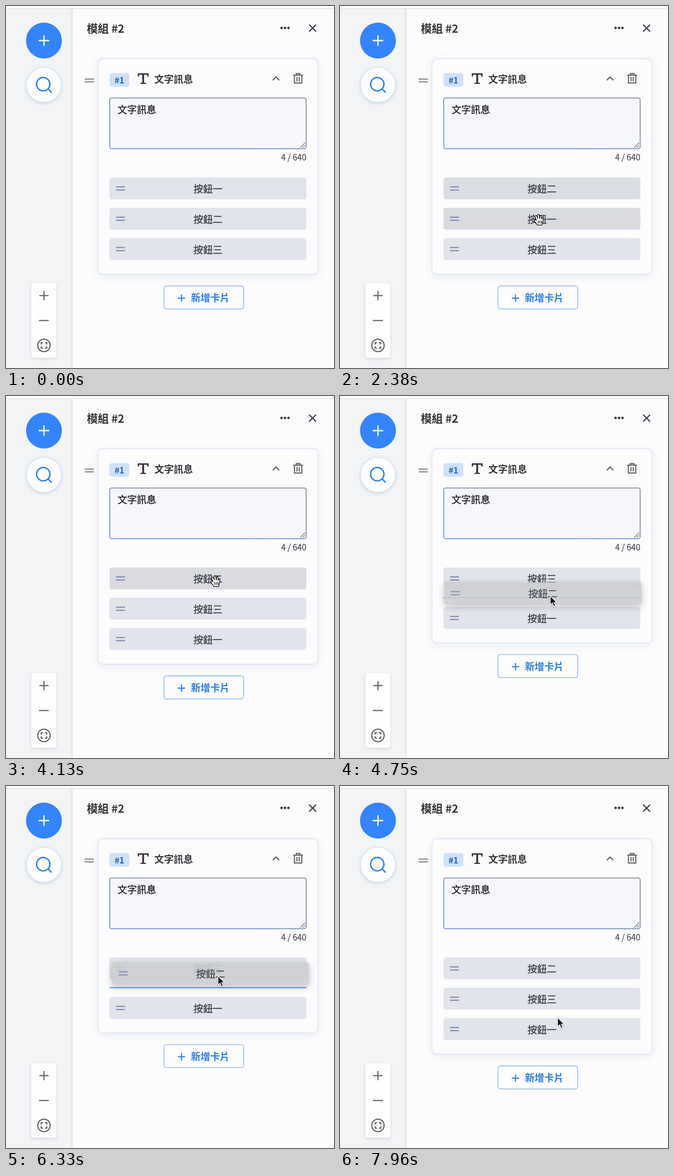
Recreate the animation shown at these times as an HTML page. Size 713 by 785 pixels, loop 8 s.

```html
<!DOCTYPE html>
<html lang="zh-Hant">
<head>
<meta charset="utf-8">
<title>Reorder buttons</title>
<style>
  html, body { margin: 0; width: 100%; height: 100%; overflow: hidden; background: #fcfcfc; }
  svg { display: block; width: 713px; height: 785px; }
  text { font: 500 21px "Noto Sans CJK TC", "Noto Sans CJK", "Noto Sans CJK JP", sans-serif; fill: #3d414d; }
  .bold { font-weight: 700; }
  .medium { stroke: currentColor; stroke-width: .45; color: #3d414d; fill: currentColor; }
  .line { fill: none; stroke: #626368; stroke-width: 2.5; }
  .soft { filter: drop-shadow(0 2px 3px rgba(40, 60, 100, .16)); }
  .lift { filter: drop-shadow(0 5px 8px rgba(0, 0, 0, .27)); }
  .hand { fill: #fff; stroke: #111; stroke-width: 1.5; stroke-linejoin: round; stroke-linecap: round; }
</style>
</head>
<body>
<svg viewBox="0 0 713 785">
  <defs>
    <linearGradient id="edge" x1="0" y1="1" x2="1" y2="0">
      <stop offset=".35" stop-color="#4576cc"/><stop offset=".65" stop-color="#686b72"/>
    </linearGradient>
  </defs>

  <rect width="713" height="785" fill="#f3f4f6"/>
  <rect x="145" width="568" height="790" fill="#fcfcfc" style="filter:drop-shadow(-1px 0 3px rgba(50,60,80,.16))"/>
  <rect width="713" height="5" fill="#fefefe"/>
  <path d="M0 5.5H713" stroke="#dedfe1" stroke-width="1.4"/>

  <circle cx="82.5" cy="75" r="39" fill="#3384ff"/>
  <path d="M71 75h23M82.5 63.5v23" stroke="#fff" stroke-width="2.8"/>
  <circle class="soft" cx="82.5" cy="171" r="38" fill="#fdfdfe" stroke="#d4e6fb" stroke-width="1.5"/>
  <g fill="none" stroke="#2c80e8" stroke-width="3" stroke-linecap="round">
    <circle cx="81" cy="169.5" r="14.5"/><path d="M92 180l6.5 7"/>
  </g>

  <rect class="soft" x="55" y="601" width="54.5" height="162" rx="5" fill="#fdfdfd"/>
  <g class="line">
    <path d="M72.5 628h20M82.5 618v20M71.5 682h21.5"/>
    <circle cx="82.5" cy="736" r="13.5"/>
    <path d="M76.5 734v-4h4M84.5 730h4v4M88.5 738v4h-4M80.5 742h-4v-4"/>
  </g>

  <text class="bold" x="175.5" y="58" style="font-size:24px;fill:#333539">模組 #2</text>
  <g fill="#3b3d48"><circle cx="599" cy="47.5" r="2.7"/><circle cx="606.5" cy="47.5" r="2.7"/><circle cx="614" cy="47.5" r="2.7"/></g>
  <path class="line" d="M659 40.5l15 15M674 40.5l-15 15" style="stroke:#3f4152"/>

  <rect id="card" x="200" y="114.5" width="478" height="467" rx="10" fill="#fcfcfd" stroke="#d7dfee" stroke-width="1.3" style="filter:drop-shadow(0 4px 10px rgba(60,90,160,.1))"/>
  <path d="M171 158.5h20M171 164.5h20" stroke="#868789" stroke-width="2.5"/>
  <rect x="225" y="145.5" width="43" height="29.5" rx="5" fill="#cfe1fc"/>
  <text class="bold" x="246.5" y="167.5" text-anchor="middle" style="font-size:18px;fill:#1d62c6">#1</text>
  <path d="M286.500 146h23.500v7h-2.400l-1-4h-6.400v17.500h4v2.500h-12v-2.500h4v-17.500h-6.400l-1 4h-2.300z" fill="#333438"/>
  <text class="bold" x="322.5" y="166" style="fill:#333539">文字訊息</text>
  <path class="line" d="M580 161l7-7 7 7"/>
  <path class="line" d="M624.5 150h21M631 149.500v-3h8v3M627 150.500v16.500h16v-16.500M632.500 154v9.500M637.500 154v9.500"/>

  <rect x="225.5" y="199.500" width="427" height="110" rx="4" fill="#f5f7fc" stroke="url(#edge)" stroke-width="1.5"/>
  <path d="M639.5 307l10.5-10.5M645 307l5-5" stroke="#66686c" stroke-width="1.3"/>
  <text class="medium" x="242.5" y="231.5" style="color:#222326">文字訊息</text>
  <text class="medium" x="653" y="335" text-anchor="end" style="font-size:18px;stroke-width:.3;color:#4c4e55">4 / 640</text>

  <g id="add">
    <rect x="343.5" y="607" width="173" height="50" rx="5" fill="#fdfdfe" stroke="#7caeea" stroke-width="1.4"/>
    <path d="M373.5 633.5h16M381.500 625.500v16" stroke="#2c7de6" stroke-width="2.4"/>
    <text class="bold" x="402" y="640" style="fill:#2c7de6">新增卡片</text>
  </g>

  <path id="mark" d="M225 0h428" stroke="#5d9fee" stroke-width="2.6"/>
  <g id="rows"></g>

  <g id="cursor">
    <path id="arrow" d="M0 0V20L4.6 15.8 7.8 23.2 11.4 21.7 8.3 14.5H14.3Z" fill="#101010" stroke="#fff" stroke-width="1.5" style="filter:drop-shadow(0 1px 1px rgba(0,0,0,.3))"/>
    <g id="open" class="hand">
      <path d="M-3 12C-5 8-9 5-10 2C-10-.5-7-.5-5 2L-8-6C-8-9-5-9-4-7L-2-2L-3-9C-2-12 1-11 1-9L2-2L3-8C4-10 6-9 6-7L6-1L8-4C10-6 11-4 10-2L9 5L7 12Z"/>
      <path d="M-1 8V3M2.5 8V3M6 8V3"/>
    </g>
    <g id="fist" class="hand">
      <path d="M-4 9C-6 6-9 4-9 1C-9-1-7-1-6-1L-7-4C-6-8-3-7-2-6C-1-9 2-8 2-6C4-8 6-7 6-5C8-6 9-4 9-2C9 3 7 5 6 9Z"/>
      <path d="M-1 6V2M2 6V2M5 6V2"/>
    </g>
  </g>
</svg>
<script>
const LOOP = 8000, ENTER = 200, TOP = 371.7, STEP = 65.8, ROW = 47.5, MARK_SPACE = 20;
const FADE = 130, PRESS = 90;
const $ = id => document.getElementById(id);

const drags = [
  { item: 0, from: 0, grab: 1200, drop: 2290 },
  { item: 0, from: 1, grab: 2760, drop: 3380 },
  { item: 1, from: 0, grab: 4400, drop: 7300 }
];

// Eased cursor moves
const moves = [
  { start: ENTER, end: 800, x: 432, y: 401 },
  { start: 1250, end: 2150, x: 432, y: 463 },
  { start: 2760, end: 3340, x: 434.5, y: 490 },
  { start: 3480, end: 4100, x: 455, y: 401 },
  { start: 4400, end: 5100, x: 459, y: 465 },
  { start: 5460, end: 6620, x: 461, y: 402 },
  { start: 7300, end: 7900, x: 473, y: 502 }
];

const clamp = v => Math.min(1, Math.max(0, v));
const ease = u => u * u * (3 - 2 * u);

function cursorAt(t) {
  const at = { x: 478, y: 560 };
  for (const { start, end, x, y } of moves) {
    const k = ease(clamp((t - start) / (end - start)));
    at.x += (x - at.x) * k;
    at.y += (y - at.y) * k;
  }
  return at;
}

function liftAt(drag, t) {
  const a = cursorAt(drag.grab), b = cursorAt(t);
  return { x: b.x - a.x, y: b.y - a.y };
}

const gapAt = (drag, t) => drag.from + (liftAt(drag, t).y > 8 ? 1 : 0);

// Replay the drags up to time t
function listAt(t) {
  let order = [0, 1, 2], held = null;
  for (const drag of drags) {
    if (t < drag.grab) break;
    order = order.filter(item => item !== drag.item);
    if (t < drag.drop) held = drag;
    else order.splice(gapAt(drag, drag.drop), 0, drag.item);
  }
  return { order, held };
}

function slotUnder(y) {
  const slot = Math.floor((y - TOP) / STEP);
  return slot >= 0 && slot < 3 && y - TOP - slot * STEP < ROW ? slot : -1;
}

// The slot a row was taken from stays pressed, then fades after the drop
function glow(slot, t, hovered) {
  let level = slot === hovered ? .4 : 0;
  for (const drag of drags) {
    if (drag.from !== slot || t < drag.grab) continue;
    const stale = t < drag.drop
      ? clamp((liftAt(drag, t).y - 36) / 20)
      : 1 - clamp((t - drag.drop) / FADE);
    level = Math.max(level, stale);
  }
  return level;
}

const tint = k => `rgb(${225 - 20 * k},${228 - 22 * k},${235 - 25 * k})`;

$("rows").innerHTML = [..."一二三"].map(n => `<g><rect x="225" width="428" height="${ROW}" rx="5"/>
  <path d="M239 20.5h19.5M239 27.2h19.5" stroke="#7d8db0" stroke-width="2.5"/>
  <text class="medium" x="439" y="32.3" text-anchor="middle">按鈕${n}</text></g>`).join("");
const rows = [...$("rows").children];

function place(row, x, y, level) {
  row.setAttribute("transform", `translate(${x} ${y})`);
  row.firstChild.setAttribute("fill", tint(level));
}

function draw(t) {
  const { order, held } = listAt(t);
  const { x, y } = cursorAt(t);
  const gap = held ? gapAt(held, t) : 3;
  const hovered = held || t < ENTER ? -1 : slotUnder(y);

  order.forEach((item, slot) =>
    place(rows[item], 0, TOP + slot * STEP + (slot >= gap ? MARK_SPACE : 0), glow(slot, t, hovered)));
  rows.forEach((row, item) => {
    const lifted = held && held.item === item;
    row.setAttribute("class", lifted ? "lift" : "");
    row.setAttribute("opacity", lifted ? .9 : 1);
  });
  if (held) {
    const row = rows[held.item], lift = liftAt(held, t);
    place(row, lift.x, TOP + held.from * STEP + lift.y, 1);
    if ($("rows").lastChild !== row) $("rows").append(row);
    $("mark").setAttribute("transform", `translate(0 ${TOP + gap * STEP - .3})`);
  }
  const shrink = held ? STEP - MARK_SPACE + .6 : 0;
  $("mark").style.display = held ? "" : "none";
  $("card").setAttribute("height", 467 - shrink);
  $("add").setAttribute("transform", `translate(0 ${-shrink})`);

  const pressing = drags.some(d => (t >= d.grab - PRESS && t < d.grab) || (t >= d.drop && t < d.drop + PRESS));
  const look = pressing ? "fist" : hovered >= 0 ? "open" : "arrow";
  for (const id of ["arrow", "open", "fist"]) $(id).style.display = id === look ? "" : "none";
  $("cursor").style.display = t < ENTER ? "none" : "";
  $("cursor").setAttribute("transform", `translate(${x} ${y})`);
}

const begin = performance.now();
function tick() {
  draw((performance.now() - begin) % LOOP);
  requestAnimationFrame(tick);
}
tick();
</script>
</body>
</html>
```
